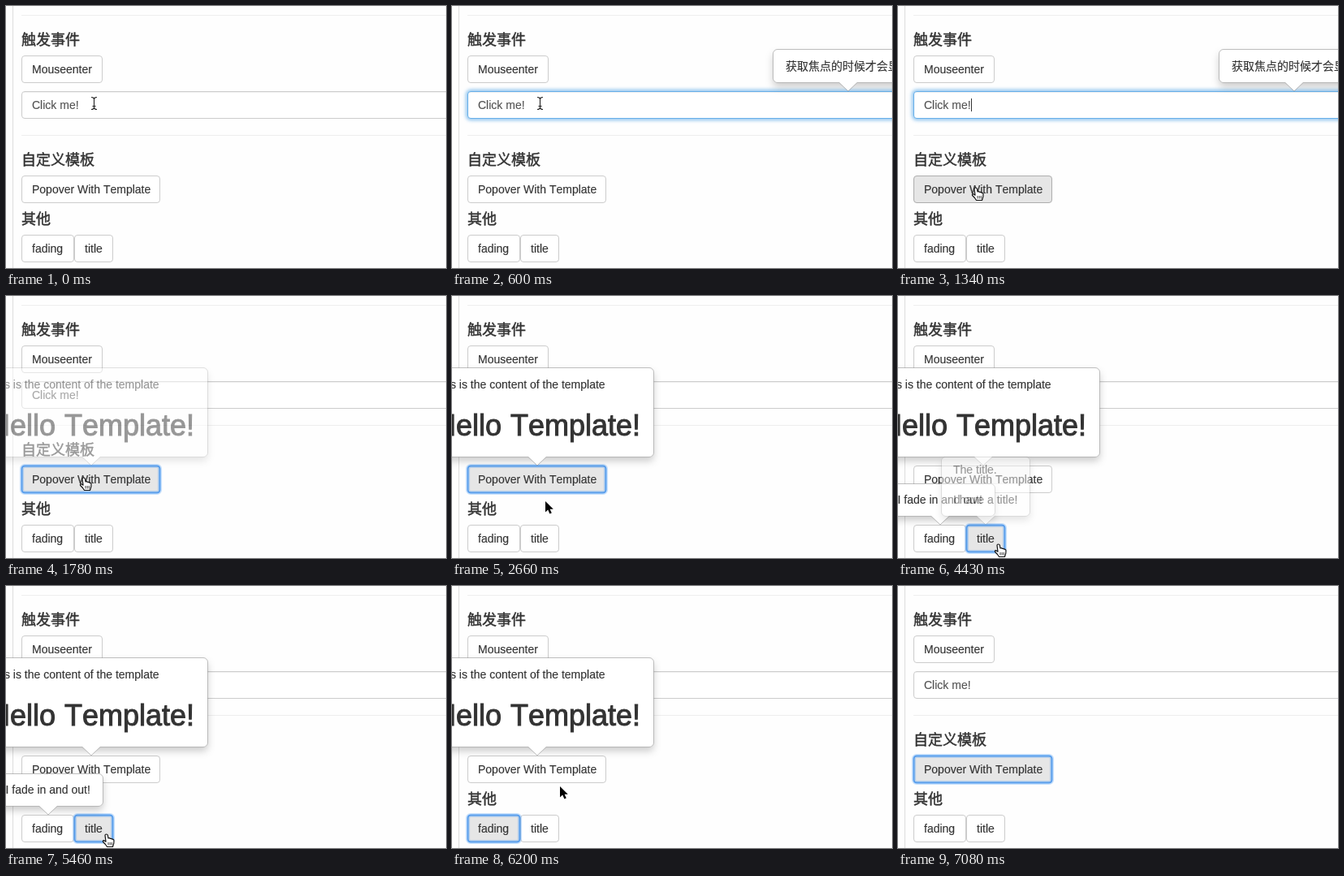
Write an HTML page that moves like this. It is 542x323 px and loops after 7410 ms.

```html
<!DOCTYPE html>
<html lang="zh-CN">
<head>
<meta charset="utf-8">
<title>Popover demo</title>
<style>
  html, body { margin: 0; width: 100%; height: 100%; overflow: hidden; background: #fefefe; }
  svg { display: block; width: 542px; height: 323px; }
  text {
    font: 14px "Liberation Sans", "Noto Sans CJK SC", "Noto Sans CJK", sans-serif;
    font-kerning: none; fill: #333; stroke: #333; stroke-width: .15; white-space: pre;
  }
  .heading { font: 500 18px "Noto Sans CJK SC", "Noto Sans CJK", sans-serif; stroke-width: .45; }
  .large { font-size: 36px; stroke-width: 1; }
  .muted { fill: #555; stroke: #555; }
</style>
</head>
<body>
<svg id="stage" viewBox="0 0 542 323">
  <defs>
    <filter id="shadow" x="-20%" y="-40%" width="140%" height="200%">
      <feDropShadow dx="0" dy="5" stdDeviation="5" flood-color="#000" flood-opacity=".2"/>
    </filter>
    <filter id="glow" filterUnits="userSpaceOnUse" x="0" y="90" width="580" height="64">
      <feGaussianBlur stdDeviation="2.2"/>
    </filter>
  </defs>
</svg>
<script>
const LOOP = 7410, TICK = 147.5;
const stage = document.getElementById('stage');

function add(parent, tag, attrs, content) {
  const node = document.createElementNS('http://www.w3.org/2000/svg', tag);
  set(node, attrs);
  if (content) node.textContent = content;
  parent.appendChild(node);
  return node;
}
function set(node, attrs) {
  for (const key in attrs) node.setAttribute(key, attrs[key]);
}
const label = (parent, x, y, content, attrs = {}) => add(parent, 'text', { x, y, ...attrs }, content);
const show = (node, on) => node.setAttribute('opacity', +on);

// Page furniture
add(stage, 'path', { d: 'M8.5 0V323', stroke: '#ddd' });
add(stage, 'path', { d: 'M19 11.5H542M19 159.5H542', stroke: '#eee' });
label(stage, 19, 48, '触发事件', { class: 'heading' });
label(stage, 19, 196, '自定义模板', { class: 'heading' });
label(stage, 19, 269, '其他', { class: 'heading' });

// Text field
const field = { x: 19.5, y: 105.5, width: 560, height: 33, rx: 3.5 };
const fieldGlow = add(stage, 'rect', { ...field, fill: 'none', stroke: '#66afe9', 'stroke-width': 5, filter: 'url(#glow)' });
const fieldBox = add(stage, 'rect', { ...field, fill: '#fff' });
add(stage, 'path', { d: 'M22 106.5H542', stroke: '#000', 'stroke-opacity': .05 });
label(stage, 32, 127, 'Click me!', { class: 'muted' });
const caret = add(stage, 'path', { d: 'M90.5 114V130', stroke: '#333' });

function button(x, y, width, content) {
  const box = { x: x + .5, y: y + .5, width: width - 1, height: 33, rx: 3.5 };
  const rect = add(stage, 'rect', box);
  label(stage, x + 13, y + 22, content);
  return { box, rect };
}
const buttons = {
  enter: button(19, 61, 100, 'Mouseenter'),
  template: button(19, 209, 171, 'Popover With Template'),
  fading: button(19, 282, 65, 'fading'),
  title: button(84, 282, 48, 'title')
};

// Focus ring, moved to whichever button has focus
const ring = add(stage, 'g', { fill: 'none' });
const ringParts = [[5.2, .3], [2, .85]].map(([width, alpha]) =>
  add(ring, 'rect', { stroke: '#4d9bf2', 'stroke-width': width, 'stroke-opacity': alpha }));

function popover(left, top, right, bottom, tip) {
  const group = add(stage, 'g', {});
  const box = { x: left, y: top, width: right - left, height: bottom - top, rx: 5.5 };
  const edge = { fill: 'none', stroke: '#000', 'stroke-opacity': .25 };
  add(group, 'rect', { ...box, fill: '#fff', filter: 'url(#shadow)' });
  add(group, 'rect', { ...box, ...edge });
  add(group, 'path', { d: `M${tip - 11} ${bottom - .5}h22v.5l-11 10.5l-11 -10.5z`, fill: '#fff' });
  add(group, 'path', { d: `M${tip - 11} ${bottom}l11 10.5l11 -10.5`, ...edge });
  return group;
}

const fieldPop = popover(395.5, 53.5, 580.5, 94.5, 488);
label(fieldPop, 411, 79, '获取焦点的时候才会显示');

const templatePop = popover(-37.5, 88.5, 248.5, 198.5, 105);
label(templatePop, -21.5, 114, 'This is the content of the template');
label(templatePop, -21, 172, 'Hello', { class: 'large' });
label(templatePop, 72, 172, 'Template!', { class: 'large' });

const fadingPop = popover(-15.5, 231.5, 119.5, 271.5, 52);
label(fadingPop, -.5, 256, 'I fade in and out!');

const titlePop = popover(53.5, 198.5, 162.5, 271.5, 108);
add(titlePop, 'path', { d: 'M54 231V204q0-5 5-5h98q5 0 5 5v27z', fill: '#f7f7f7' });
add(titlePop, 'path', { d: 'M54 231.5h108', stroke: '#ebebeb' });
label(titlePop, 68, 219, 'The title.');
label(titlePop, 68, 256, 'I have a title!');

// Pointers, each with its hot spot at the origin
const cursors = {
  beam: add(stage, 'g', { fill: 'none' }),
  arrow: add(stage, 'g', {}),
  hand: add(stage, 'g', { 'stroke-linejoin': 'round' })
};
const beamPath = 'M-3 -7.5q3 0 3.5 2q.5 -2 3.5 -2M.5 -5.5V5.5M-3 7.5q3 0 3.5 -2q.5 2 3.5 2M-1.5 3.5h4';
add(cursors.beam, 'path', { d: beamPath, stroke: '#fff', 'stroke-width': 2.4 });
add(cursors.beam, 'path', { d: beamPath, stroke: '#222', 'stroke-width': 1.1 });
add(cursors.arrow, 'path', {
  d: 'M0 0V13.5L3.2 10.6L5.4 15.6L7.8 14.6L5.6 9.8H9.8Z',
  stroke: '#fff', 'stroke-width': 1.8, 'paint-order': 'stroke'
});
add(cursors.hand, 'path', {
  d: 'M-2 1.5Q-2 0-.5 0Q1.2 0 1.4 1.5L2 5Q3.5 4.2 4.4 5.5Q6 4.8 6.8 6.2Q8.8 5.8 9 8L8.8 11L7.5 15.5H.5L-1.5 12.5L-4.4 9.5Q-5 7.8-3.6 7.6L-1 9.2Z',
  fill: '#fff', stroke: '#111', 'stroke-width': 1.2
});
add(cursors.hand, 'path', { d: 'M2 10v3.5M4.2 10v3.5M6.3 10v3.5', stroke: '#111', 'stroke-width': .8 });

// Pointer positions: [tick, kind, x, y], each held until the next
const track = [
  [0, 'beam', 108, 120], [6, 'beam', 107, 131], [7, 'arrow', 103, 165],
  [8, 'hand', 98, 214], [9, 'hand', 96, 224],
  [14, 'hand', 99, 227], [15, 'hand', 104, 233], [16, 'arrow', 111, 246],
  [17, 'arrow', 114, 251], [18, 'arrow', 115, 253],
  [19, 'arrow', 103, 264], [20, 'hand', 74, 290], [21, 'hand', 58.5, 309],
  [27, 'hand', 72, 308], [28, 'hand', 108, 306], [29, 'hand', 124, 306],
  [38, 'hand', 92, 304], [39, 'hand', 62, 303],
  [41, 'arrow', 98, 276], [42, 'arrow', 133, 247], [43, 'hand', 132, 229],
  [46, 'arrow', 210, 250], [47, 'arrow', 451, 306], [48, 'none', 0, 0]
];

const focusTrack = [
  [0, null], [1, 'field'], [11, 'template'], [22, 'fading'],
  [30, 'title'], [39, 'fading'], [44, 'template']
];

const at = (list, tick) => list.filter(entry => entry[0] <= tick).pop();
const fade = (tick, on, off) =>
  tick === on || tick === off ? .5 : +(tick > on && tick < off);
const inside = (box, x, y) =>
  x > box.x && x < box.x + box.width && y > box.y && y < box.y + box.height;

function render(time) {
  const tick = Math.floor((time % LOOP + 10) / TICK);
  const [, kind, x, y] = at(track, tick);
  const focus = at(focusTrack, tick)[1];
  const typing = focus === 'field';

  show(fieldGlow, typing ? .75 : 0);
  set(fieldBox, { stroke: typing ? '#66afe9' : '#ccc' });
  show(caret, typing && (tick < 4 || tick >= 7));

  for (const name in buttons) {
    const { box, rect } = buttons[name];
    const active = focus === name || inside(box, x, y);
    set(rect, { fill: active ? '#e6e6e6' : '#fff', stroke: active ? '#adadad' : '#ccc' });
  }
  const focused = buttons[focus];
  show(ring, !!focused);
  if (focused) ringParts.forEach(part => set(part, focused.box));

  show(fieldPop, fade(tick, 1, 11));
  show(templatePop, fade(tick, 12, 45));
  show(fadingPop, fade(tick, 23, 39));
  show(titlePop, fade(tick, 30, 36));

  for (const name in cursors) {
    show(cursors[name], name === kind);
    set(cursors[name], { transform: `translate(${x} ${y})` });
  }
}

const start = performance.now();
function loop() {
  render(performance.now() - start);
  requestAnimationFrame(loop);
}
loop();
</script>
</body>
</html>
```
